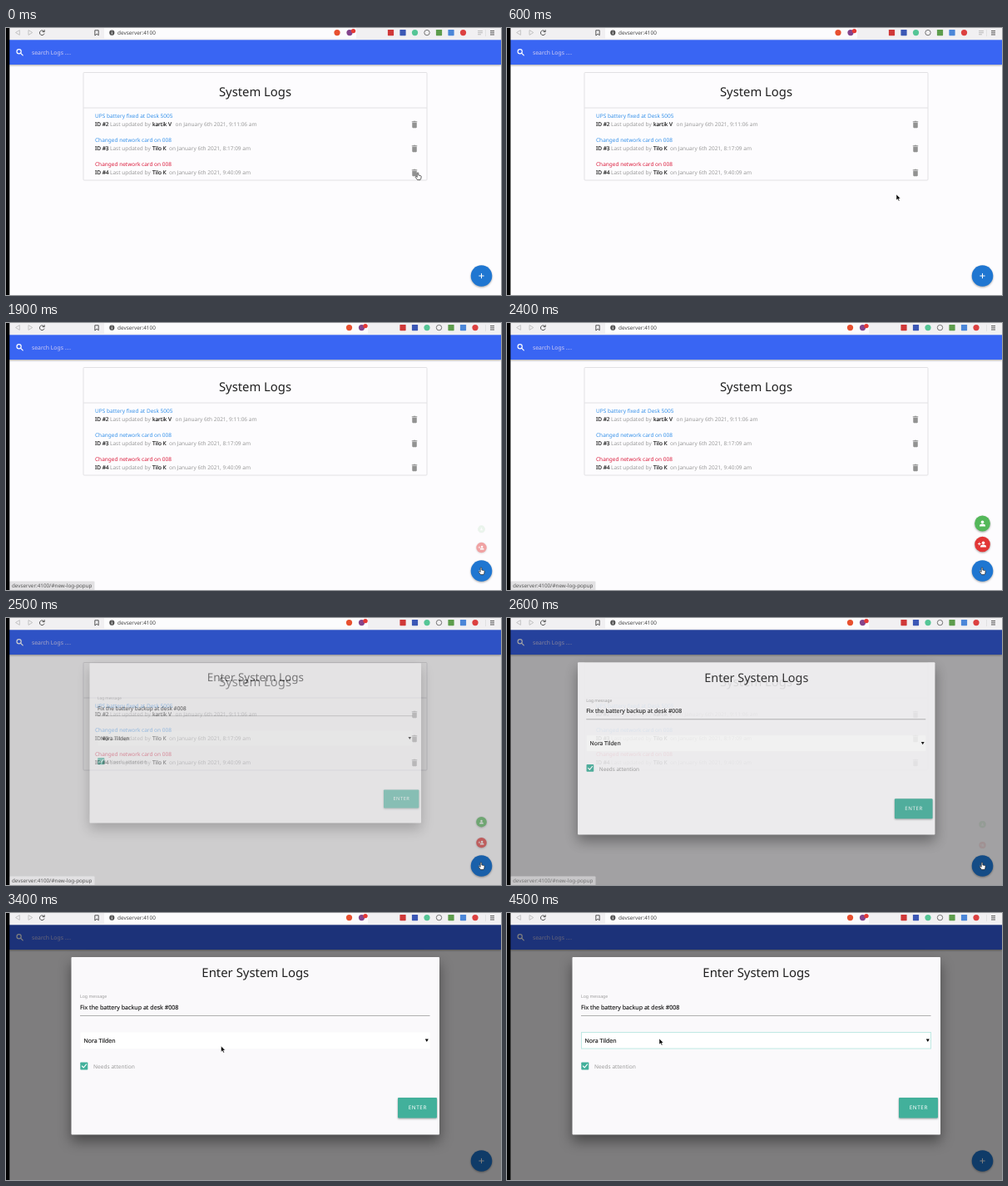
An HTML page for the animation above (5 s loop, 595 px wide and 321 px high).

```html
<!DOCTYPE html>
<html lang="en">
<head>
<meta charset="utf-8">
<title>System Logs</title>
<style>
  html, body { margin: 0; width: 595px; height: 321px; overflow: hidden; background: #fdfcfe; }
  svg { display: block; }
  text { font: 6.5px "Noto Sans", "Open Sans", sans-serif; text-rendering: geometricPrecision; white-space: pre; }
  .mid { text-anchor: middle; }
  .dark { fill: #161616; stroke: #161616; stroke-width: .14px; }
  .grey { fill: #9b9b9b; }
  .line { fill: none; stroke-linecap: round; stroke-linejoin: round; }
  .lift { filter: drop-shadow(0 1px 1.2px rgba(0,0,0,.35)); }
  #panel { filter: drop-shadow(0 8px 8px rgba(0,0,0,.42)); }
</style>
</head>
<body>
<svg width="595" height="321" viewBox="0 0 595 321">
  <defs>
    <path id="trash" fill="#929292" transform="scale(.46) translate(-12 -12)"
      d="M6 19c0 1.1.9 2 2 2h8c1.1 0 2-.9 2-2V7H6zM19 4h-3.5l-1-1h-5l-1 1H5v2h14z"/>
    <g id="person" fill="#fff"><circle cy="-1.8" r="1.8"/><path d="M-3.5 3.5V2.4C-3.5 1-1.3.5 0 .5S3.5 1 3.5 2.4v1.1z"/></g>
  </defs>

  <!-- page -->
  <rect width="595" height="321" fill="#fdfcfe"/>
  <g class="lift">
    <rect x="4" y="14" width="591" height="30" fill="#3965f3"/>
  </g>
  <g class="line" stroke="#fff" stroke-width="1.2"><circle cx="15.6" cy="28.2" r="2.6"/><path d="M17.7 30.3l2.5 2.6"/></g>
  <text x="31" y="31.8" fill="#d3cdf2" style="font-size:6.8px">search Logs ....</text>
  <rect x="93" y="53.5" width="413" height="129.5" rx="1" fill="#fdfcfe" stroke="#e2e1e4"/>
  <path d="M93 96h413" stroke="#e2e1e4"/>
  <text class="mid" x="299.5" y="82.2" fill="#202020" style="font-size:14.8px">System Logs</text>
  <g id="rows"></g>
  <g id="green"><circle class="lift" r="9.4" fill="#54b85a"/><use href="#person"/></g>
  <g id="red"><circle class="lift" r="9.3" fill="#e23636"/><use href="#person" x="1"/>
    <path class="line" d="M-5.2-.5h3M-3.7-2v3" stroke="#fff" stroke-width=".9"/></g>
  <circle class="lift" cx="571.5" cy="298" r="12.8" fill="#1f76d1"/>
  <path d="M568.4 298h6.2M571.5 294.9v6.2" stroke="#fff" stroke-width="1"/>
  <rect id="shade" x="4" y="14" width="591" height="307"/>

  <!-- dialog -->
  <g id="modal">
    <rect id="panel" x="78.5" y="53" width="442.5" height="213.5" rx="1" fill="#faf9fb"/>
    <text class="mid" x="299.8" y="77.3" fill="#202020" style="font-size:14.9px">Enter System Logs</text>
    <text class="grey" x="89" y="102" style="font-size:5.2px">Log message</text>
    <text class="dark" x="89" y="115.6" style="font-size:7.1px">Fix the battery backup at desk #008</text>
    <path d="M89 123.5h420.5" stroke="#9e9e9e" stroke-width=".8"/>
    <rect id="select" x="89.5" y="143.5" width="420" height="19.5" fill="#fff"/>
    <text class="dark" x="93.5" y="155.7" style="font-size:7px">Nora Tilden</text>
    <path d="M503.8 151.6h4l-2 3.4z"/>
    <rect x="89.3" y="179.5" width="9" height="9" rx=".8" fill="#42b09b"/>
    <path class="line" d="M91.4 184l1.8 1.9 3.4-4" stroke="#fff" stroke-width="1.1"/>
    <text class="grey" x="105" y="187.3" style="font-size:6.6px">Needs attention</text>
    <rect class="lift" x="471" y="222" width="47" height="24.5" rx="1" fill="#42b09b"/>
    <text class="mid" x="494.8" y="236.4" fill="#fff" style="font-size:6.3px;letter-spacing:.6px">ENTER</text>
  </g>

  <!-- browser frame -->
  <g id="status">
    <rect x="4" y="310.5" width="102.5" height="11" rx="1" fill="#e2e1e3"/>
    <text x="7" y="318.4" fill="#555" style="font-size:6.3px">devserver:4100/#new-log-popup</text>
  </g>
  <rect x="4" width="591" height="14.3" fill="#f1f0f2"/>
  <rect id="field" x="118" width="303" height="12.5" fill="#fcfcfd"/>
  <g class="line" stroke="#bdbdbd" stroke-width=".9"><path d="M16.3 3v5.4l-4.4-2.7zM27 3v5.4l4.4-2.7z"/></g>
  <g class="line" stroke="#444" stroke-width=".9">
    <path d="M45.8 4.2A2.9 2.9 0 1 0 46 7M46.2 2.6v2h-2"/>
    <path d="M107.2 2.8h4v6l-2-1.6-2 1.6z"/>
  </g>
  <circle cx="127.3" cy="5.7" r="3.1" fill="#555"/>
  <path d="M127.3 5.2v2.2M127.3 3.6v.8" stroke="#fff" stroke-width=".9"/>
  <text x="134" y="8.1" fill="#444" style="font-size:6.4px">devserver:4100</text>
  <g id="tools"></g>
  <path id="list" class="line" d="M567.5 3.6h5M567.5 5.7h5M567.5 7.8h3" stroke="#aaa" stroke-width=".8"/>
  <path d="M576.5 2v8" stroke="#ddd" stroke-width=".8"/>
  <path d="M582 3.6h5M582 5.8h5M582 8h5" stroke="#444" stroke-width=".9"/>
  <rect width="4.3" height="321"/>

  <!-- pointers -->
  <path id="arrow" d="M0 0v7l1.6-1.5 1.2 2.6 1.2-.6-1.2-2.4h2.2z" fill="#000" stroke="#fff" stroke-width=".5"/>
  <path id="hand" class="line" style="fill:#fff" stroke="#222" stroke-width=".7"
    d="M-.8 5V.3q.8-.9 1.6 0V3l2.6.6q.9.3.8 1.2L3.7 7.3 3 8.6H-.4L-2.8 5.4q0-1.2 1-.9z"/>
</svg>
<script>
const $ = id => document.getElementById(id);
const set = (id, attrs) => { for (const k in attrs) $(id).setAttribute(k, attrs[k]); };
const part = (t, start, span) => Math.min(1, Math.max(0, (t - start) / span));
const easeOut = (p, power) => 1 - (1 - p) ** power;

const logs = [
  ["#2", "UPS battery fixed at Desk 5005", "kartik V", "9:11:06", "#3591ea", 203.5],
  ["#3", "Changed network card on 008", "Tilo K", "8:17:09", "#3591ea", 196],
  ["#4", "Changed network card on 008", "Tilo K", "9:40:09", "#db1c3c", 196],
];
$("rows").innerHTML = logs.map(([id, title, name, time, color, x], i) => `
  <g transform="translate(0 ${i * 29})">
    <text x="107" y="107.7" fill="${color}">${title}</text>
    <text class="dark" x="107" y="117.7">ID ${id}</text>
    <text class="grey" x="125" y="117.7">Last updated by</text>
    <text class="dark" x="176" y="117.7">${name}</text>
    <text class="grey" x="${x}" y="117.7">on January 6th 2021, ${time} am</text>
    <use href="#trash" x="491" y="116"/>
  </g>`).join("");

// toolbar buttons: x, colour, round
const tools = [
  [398, "#e8502f", 1], [413, "#84458c", 1], [462.5, "#cf3838", 0], [477, "#3b57b5", 0],
  [491.5, "#55c596", 1], [520.5, "#5d9c4c", 0], [535, "#4b86d8", 0], [549.5, "#dc4040", 1],
];
$("tools").innerHTML = tools.map(([x, color, round]) =>
  `<rect x="${x - 3.6}" y="2" width="7.2" height="7.2" rx="${round ? 3.6 : .6}" fill="${color}"/>`).join("") +
  `<circle cx="417.5" cy="3.6" r="2.7" fill="#e53935"/>
   <circle cx="506" cy="5.6" r="3.2" fill="none" stroke="#666" stroke-width=".9"/>`;

// pointer route: time, x, y
const route = [
  [0, 495, 174], [200, 495, 174], [600, 468, 200], [1200, 470, 251], [1300, 471, 252],
  [1800, 571, 294], [2900, 571, 294], [3400, 258.5, 160], [3500, 170, 150], [3700, 108, 167],
  [3900, 140, 138], [4200, 182, 152], [4400, 182, 152], [4500, 183, 151], [5000, 183, 151],
];
function pointer(t) {
  const i = route.findIndex(k => k[0] > t);
  const [a, ax, ay] = route[i - 1], [b, bx, by] = route[i];
  const p = (t - a) / (b - a), s = p * p * (3 - 2 * p);
  return `translate(${ax + (bx - ax) * s} ${ay + (by - ay) * s})`;
}

function popButton(id, y, t, delay) {
  const shown = easeOut(part(t, 1850 + delay, 275), 3);
  const gone = easeOut(part(t, 2420, 240), 2);
  const size = (.4 + .6 * shown) * (1 - .6 * gone);
  const drop = 7.5 * (1 - shown + gone);
  set(id, { transform: `translate(571.5 ${y + drop}) scale(${size})`, opacity: shown * (1 - gone * gone) });
}

function draw(now) {
  const t = Math.floor(now % 5000 / 100) * 100;

  popButton("red", 266, t, 0);
  popButton("green", 241, t, 40);

  const open = part(t, 2421, 380), grow = easeOut(open, 3);
  set("shade", { opacity: .5 * easeOut(open, 2) });
  set("modal", {
    opacity: grow,
    transform: `translate(299.8 ${141 + 19 * grow}) scale(${.8 + .2 * grow}) translate(-299.8 -160)`,
  });
  set("select", { stroke: t >= 4200 ? "#bfe9e3" : "none" });
  set("status", { opacity: t < 1900 ? 0 : 1 - .4 * part(t, 2500, 100) - .6 * part(t, 2600, 100) });

  const narrow = t >= 1900;
  set("tools", { transform: `translate(${narrow ? 14.5 : 0} 0)` });
  set("field", { width: narrow ? 317 : 303 });
  set("list", { opacity: narrow ? 0 : 1 });

  const hand = t < 300 || t >= 1800 && t < 2900;
  const place = pointer(t);
  set("hand", { transform: place, opacity: +hand });
  set("arrow", { transform: place, opacity: +!hand });
}

const start = performance.now();
(function tick() {
  draw(performance.now() - start);
  requestAnimationFrame(tick);
})();
</script>
</body>
</html>
```
